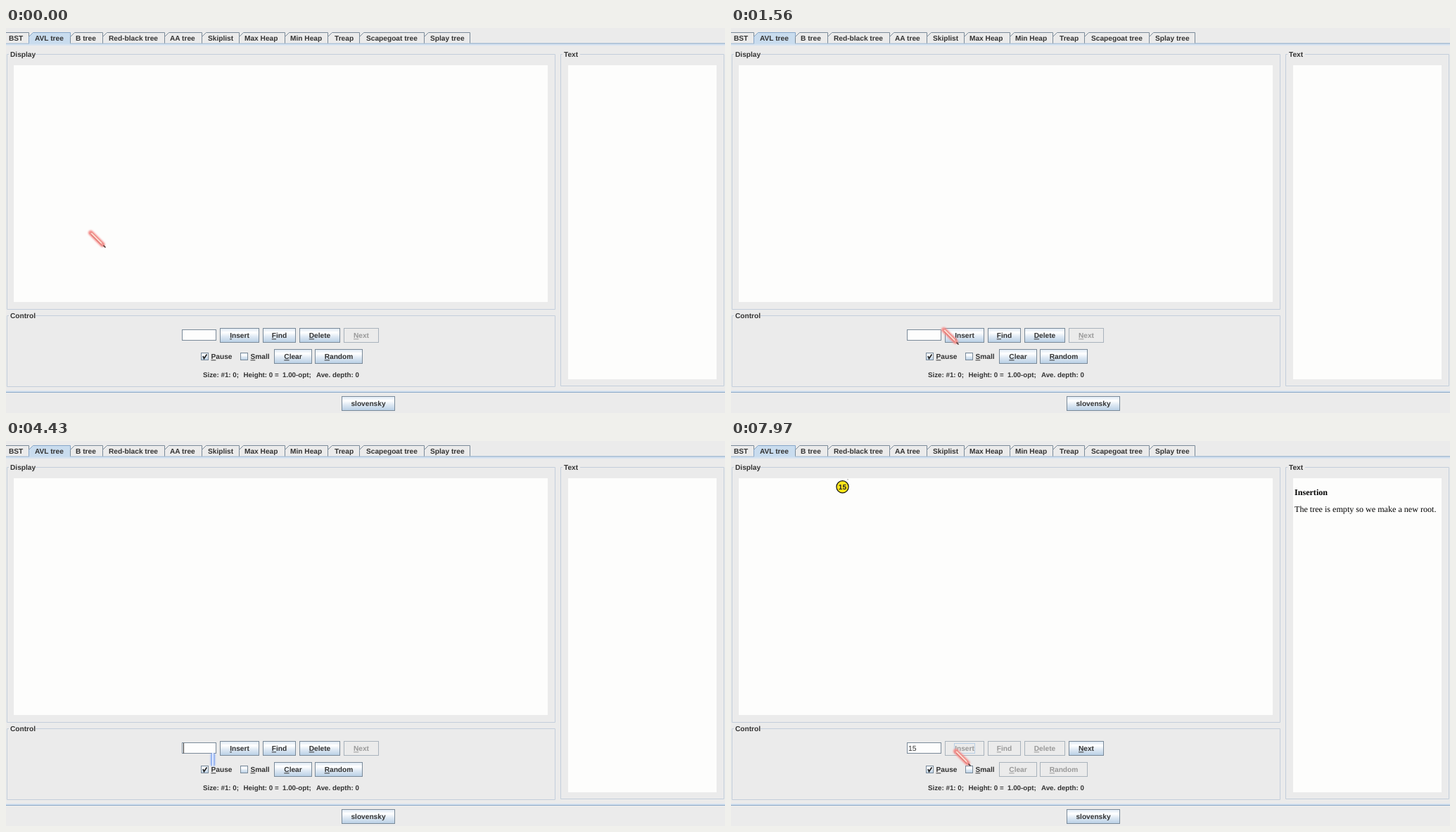
These frames come from a looping animation (1022 by 548 pixels, 8 s). An HTML page:

```html
<!DOCTYPE html>
<html lang="en">
<head>
<meta charset="utf-8">
<title>AVL tree</title>
<style>
  html, body { margin: 0; width: 100%; height: 100%; overflow: hidden; background: #ebebeb; }
  svg { display: block; width: 1022px; height: 548px; }
  text { font: bold 10.17px "Liberation Sans", Arial, sans-serif; fill: #333; white-space: pre; text-rendering: geometricPrecision; }
  .mid { text-anchor: middle; }
  .key { text-decoration: underline; }
  .stat { font-size: 9.75px; }
  .plain { font-weight: normal; font-size: 10.4px; }
  .doc, .head { font: 12.1px "Liberation Serif", Times, serif; fill: #000; }
  .head { font-weight: bold; }
  .off rect { fill: #ebebeb; stroke: #a9b3bc; }
  .off text { fill: #999; }
</style>
</head>
<body>
<svg viewBox="0 0 1022 548">
  <defs>
    <linearGradient id="steel" x2="0" y2="1">
      <stop stop-color="#dde8f3"/><stop offset=".3" stop-color="#fff"/>
      <stop offset=".6" stop-color="#dde8f3"/><stop offset="1" stop-color="#b8cfe5"/>
    </linearGradient>
    <clipPath id="view"><path d="M11 53H770V390H11Z"/></clipPath>
    <filter id="glow" filterUnits="userSpaceOnUse" x="-8" y="-8" width="48" height="48">
      <feGaussianBlur stdDeviation="1.2"/>
    </filter>
  </defs>
  <g id="ui"></g>
  <g id="result">
    <text class="head" x="801" y="77">Insertion</text>
    <text class="doc" x="801" y="101">The tree is empty so we make a new root.</text>
    <rect x="317.5" y="430.5" width="29" height="14" fill="none" stroke="#b8cfe5"/>
    <g clip-path="url(#view)">
      <g id="node">
        <circle r="8.6" fill="#ffe51a" stroke="#111" stroke-width="1.2"/>
        <text class="mid" y="3.7" style="fill:#222">15</text>
        <path d="M7 -10.500h1" stroke="#555"/>
      </g>
    </g>
  </g>
  <text id="typed" class="plain" x="252" y="441"></text>
  <path id="caret" d="M0 430V444.500" stroke="#333"/>
  <g id="pencil">
    <path d="M2.500 2.500L19 19" stroke="#f58f8c" stroke-width="7" stroke-linecap="round" filter="url(#glow)"/>
    <path d="M1 3.500L3.500 1L19.500 17L22.500 22.500L17 19.500Z" fill="#f4a09a" stroke="#e98480"/>
    <path d="M3.500 3L18 17.500" stroke="#fbe3d6" stroke-width="1.6"/>
    <path d="M3 5L17.500 19.500" stroke="#d9706c" stroke-width=".8"/>
    <path d="M20.500 20.500L23.500 23.500" stroke="#54403c" stroke-width="1.7"/>
  </g>
  <g id="beam">
    <path d="M16 8V25" stroke="#85a9f4" stroke-width="6" filter="url(#glow)"/>
    <path d="M14.500 7.500V25.500M17.500 7.500V25.500" stroke="#8cacf0"/>
    <path d="M16 7V26" stroke="#e6eeff" stroke-width="2"/>
  </g>
</svg>
<script>
const $ = id => document.getElementById(id);
const border = '#7a8a99', accent = '#86a6c8', strip = '#d8e4f0';
const path = (d, stroke, fill = 'none') => `<path d="${d}" stroke="${stroke}" fill="${fill}"/>`;
const text = (s, x, y, cls = '') => `<text x="${x}" y="${y}" class="${cls}">${s}</text>`;
const block = (x, y, w, h, fill, stroke = 'none') =>
  `<rect x="${x}" y="${y}" width="${w}" height="${h}" fill="${fill}" stroke="${stroke}"/>`;
const keyed = s => `<tspan class="key">${s[0]}</tspan>${s.slice(1)}`;

// name, left edge, text start
const tabs = [
  ['BST', -8, 4], ['AVL tree', 32, 41], ['B tree', 91, 99], ['Red-black tree', 137, 146],
  ['AA tree', 225, 233], ['Skiplist', 278, 287], ['Max Heap', 331, 339], ['Min Heap', 396, 404],
  ['Treap', 457, 467], ['Scapegoat tree', 502, 512], ['Splay tree', 594, 603]
];
const drawTab = ([name, x, tx], i) => {
  const right = i + 1 < tabs.length ? tabs[i + 1][1] : 659;
  const active = name === 'AVL tree';
  const shape = `M${x + .5} 21.5V12.5L${x + 6.5} 6.500H${right + .5}V21.5`;
  return path(shape, active ? accent : border, active ? '#c9dcee' : '#ebebeb') + text(name, tx, 18);
};

// title, left, top, right, bottom, title width
const panels = [
  ['Display', 1, 37, 780, 400, 36], ['Control', 1, 409, 780, 510, 36], ['Text', 788, 37, 1020, 509, 23]
];
const drawPanel = ([title, l, t, r, b, w]) =>
  path(`M${l + 3} ${t + .5}H${l + .5}V${b + .5}H${r + .5}V${t + .5}H${l + 5 + w}`, '#c3cedb') +
  text(title, l + 5, t + 4);

const buttons = [
  ['Insert', 304, 427, 56], ['Find', 365, 427, 47], ['Delete', 417, 427, 58], ['Next', 480, 427, 50],
  ['Clear', 381, 457, 54], ['Random', 439, 457, 68], ['slovensky', 477, 524, 76]
];
const drawButton = ([name, x, y, w]) => `<g id="${name}">` +
  block(x + .5, y + .5, w - 1, 20, 'url(#steel)', border) +
  text(name === 'slovensky' ? name : keyed(name), x + w / 2, y + 14.3, 'mid') + '</g>';

const drawCheck = (name, x) =>
  block(x + .5, 462.5, 10, 10, 'url(#steel)', border) + text(keyed(name), x + 14.5, 471.3);

$('ui').innerHTML =
  block(0, 22, 1022, 3, strip) + path('M0 22H1022', accent) +
  tabs.map(drawTab).join('') + block(33, 21, 58, 2, '#c9dcee') +
  panels.map(drawPanel).join('') +
  block(11, 53, 759, 337, '#fdfdfc') + block(799, 53, 211, 447, '#fdfdfc') +
  block(250.5, 429.5, 48, 15, '#fdfdfd', border) +
  drawCheck('Pause', 277) + drawCheck('Small', 333) +
  '<path d="M280 467L281.500 470.500L285.500 464.500" stroke="#222" stroke-width="1.7" fill="none"/>' +
  text('Size: #1: 0;', 280, 497.3, 'stat') + text('Height: 0 =  1.00-opt;', 337.5, 497.3, 'stat') +
  text('Ave. depth: 0', 441, 497.3, 'stat') +
  block(0, 516, 1022, 2, strip) + path('M0 518.500H1022', accent) +
  buttons.map(drawButton).join('');

const LOOP = 8000, INSERTED = 7540;
// time, x, y of the pointer's hot spot
const pointer = [
  [0, 118, 289], [830, 383, 36], [860, 383, 36], [1360, 301, 426], [1500, 301, 426],
  [1560, 300, 427], [1900, 278, 437], [7240, 278, 437], [7500, 317, 439], [LOOP, 317, 439]
];
// time, text in the field, caret position (0 = hidden)
const typing = [
  [0, '', 0], [4430, '', 252.5], [4940, '', 0], [5440, '', 252.5], [5940, '', 0],
  [6070, '1', 258.5], [6370, '15', 264.5], [6870, '15', 0]
];
const ease = p => p * p * (3 - 2 * p);
const place = (el, x, y) => el.setAttribute('transform', `translate(${x} ${y})`);
const show = (el, on) => el.setAttribute('visibility', on ? 'visible' : 'hidden');

function pointerAt(t) {
  const i = Math.max(1, pointer.findIndex(k => k[0] > t));
  const [a, b] = [pointer[i - 1], pointer[i]];
  const p = ease((t - a[0]) / (b[0] - a[0]));
  return [1, 2].map(n => a[n] + (b[n] - a[n]) * p);
}

function draw(t) {
  const [x, y] = pointerAt(t);
  const inField = x > 250 && x < 299 && y > 429 && y < 445;
  place($('pencil'), x, y);
  place($('beam'), x, y);
  show($('pencil'), !inField);
  show($('beam'), inField);

  const [, value, caret] = typing.findLast(k => k[0] <= t);
  $('typed').textContent = value;
  place($('caret'), caret, 0);
  show($('caret'), caret > 0);

  const done = t >= INSERTED;
  show($('result'), done);
  for (const id of ['Insert', 'Find', 'Delete', 'Clear', 'Random']) $(id).classList.toggle('off', done);
  $('Next').classList.toggle('off', !done);
  const p = Math.min(1, Math.max(0, (t - INSERTED) / (7970 - INSERTED)));
  place($('node'), 35 + 123.5 * p, 57 + 8.3 * p);
}

const start = performance.now();
function tick() {
  draw((performance.now() - start) % LOOP);
  requestAnimationFrame(tick);
}
tick();
</script>
</body>
</html>
```
